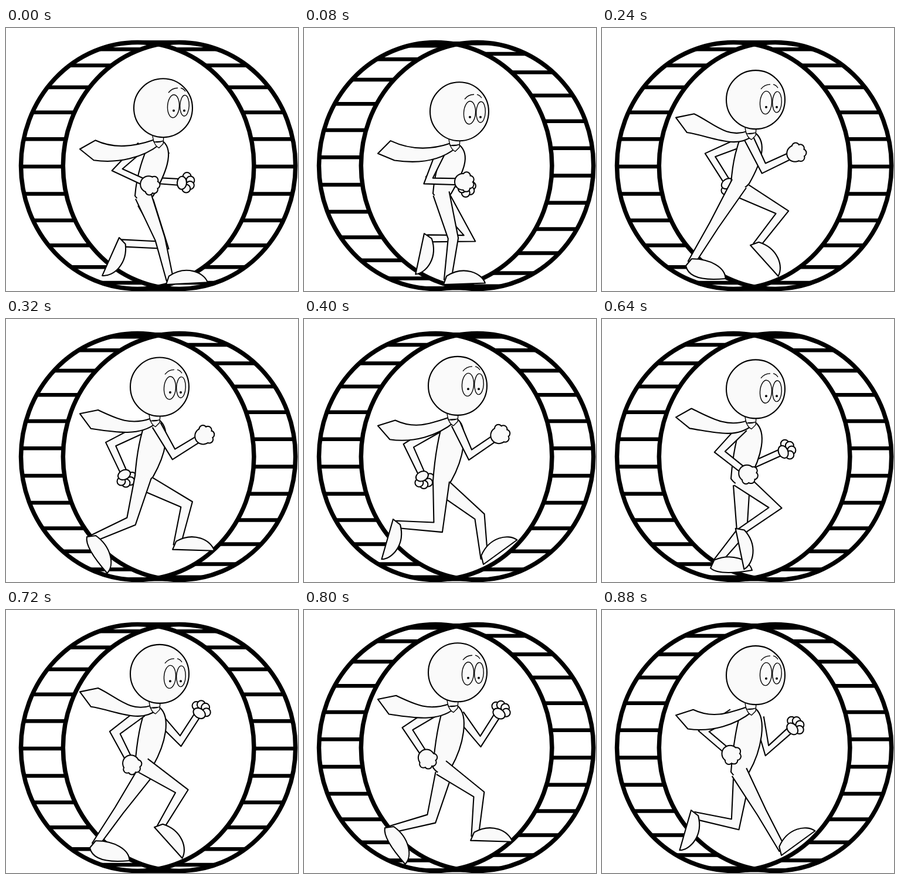
Recreate the animation shown at these times as an HTML page with a canvas. Size 498 by 448 pixels, loop 920 ms.

```html
<!DOCTYPE html>
<html lang="en">
<head>
<meta charset="utf-8">
<title>Running in a wheel</title>
<style>
html, body { margin: 0; width: 100%; height: 100%; overflow: hidden; background: #fff; }
canvas { display: block; }
</style>
</head>
<body>
<canvas id="stage" width="498" height="448"></canvas>
<script>
const ctx = document.getElementById('stage').getContext('2d');
const LOOP = 920, SLOT = 40;
const STRIDE = 960, STEP = STRIDE / 2;
const HOLDS = [120, 360, 440, 680, 840]; // slots that repeat the picture before them
const PAPER = '#fafafa', INK = '#000';

// Tracks of one value each: four keys repeat every step, eight every stride.
const KEYS = [0, 80, 240, 400];
const bob = {
  head: [134, 137, 115.5, 112.5],
  hip:  [286, 282, 265, 276],
  gaze: [-3, 2, 5, -2],
  tie:  [15, 9.5, -17, 18],
  flick: [-2, 5, -9.5, -7]
};
const foot = {
  x: [273, 238, 143, 152, 193, 205, 253, 306],
  y: [437, 437, 405, 341, 357, 350, 370, 418],
  angle: [-3, -2, 18, 106, 114, 102, 48, -36]
};
const nearHand = {
  x: [245, 273, 331, 334, 312, 291, 214, 220],
  y: [267, 262, 213, 197, 244, 260, 263, 246]
};
const farHand = {
  x: [304, 275, 217, 204, 240, 284, 331, 327],
  y: [263, 270, 268, 271, 280, 283, 172, 199]
};

const add = (p, x, y) => [p[0] + x, p[1] + y];
const wave = (t, peak) => Math.cos(2 * Math.PI * (t - peak) / STRIDE);

// Smooth cyclic curve through the keys of a track.
function at(track, t) {
  const n = track.length;
  t %= STEP * n / 4;
  const time = j => KEYS[(j + 4) % 4] + STEP * Math.floor(j / 4);
  const val = j => track[(j + n) % n];
  let i = n - 1;
  while (time(i) > t) i--;
  const d = time(i + 1) - time(i), s = (t - time(i)) / d;
  const slope = j => (val(j + 1) - val(j - 1)) / (time(j + 1) - time(j - 1)) * d;
  const s2 = s * s, s3 = s2 * s;
  return (2 * s3 - 3 * s2 + 1) * val(i) + (s3 - 2 * s2 + s) * slope(i) +
    (3 * s2 - 2 * s3) * val(i + 1) + (s3 - s2) * slope(i + 1);
}

function pose(part, t) {
  const out = {};
  for (const k in part) out[k] = at(part[k], t);
  return out;
}

function paint(path, width = 2.1, fill = PAPER) {
  if (fill) {
    ctx.fillStyle = fill;
    ctx.fill(path);
  }
  ctx.strokeStyle = INK;
  ctx.lineWidth = width;
  ctx.stroke(path);
}

function oval(x, y, rx, ry, width, fill, tilt = 0) {
  const p = new Path2D();
  p.ellipse(x, y, rx, ry, tilt, 0, Math.PI * 2);
  paint(p, width, fill);
}

function dot(x, y, r, fill) {
  ctx.fillStyle = fill;
  ctx.beginPath();
  ctx.arc(x, y, r, 0, Math.PI * 2);
  ctx.fill();
}

function wheel(t) {
  const cy = 234.5, ry = 210;
  const rings = [[224.2, 198.7], [295.5, 198.2]];
  ctx.strokeStyle = INK;
  ctx.lineWidth = 6.5;
  for (const side of [-1, 1]) {
    for (let k = -12; k <= 12; k++) {
      const u = k + side * t / 240 + 0.03;
      const deg = 12.75 * u + 0.06 * u ** 3;
      if (Math.abs(deg) > 91) continue;
      const a = deg * Math.PI / 180, y = cy + ry * Math.sin(a);
      ctx.beginPath();
      for (const [cx, rx] of rings) ctx.lineTo(cx + side * rx * Math.cos(a), y);
      ctx.stroke();
    }
  }
  for (const [cx, rx] of rings) oval(cx, cy, rx, ry, 7.5, null);
}

// Joint between root and end for two bones; side picks the way it bends.
function joint(root, end, upper, lower, side) {
  const dx = end[0] - root[0], dy = end[1] - root[1], d = Math.hypot(dx, dy);
  const along = d >= upper + lower ? d * upper / (upper + lower)
    : (d * d + upper * upper - lower * lower) / (2 * d);
  const out = side * Math.sqrt(Math.max(0, upper * upper - along * along)) * (d < upper + lower);
  return add(root, (dx * along - dy * out) / d, (dy * along + dx * out) / d);
}

// Tapered two-part limb, open at its root.
function limb(pts, half) {
  const dir = (a, b) => Math.atan2(b[1] - a[1], b[0] - a[0]);
  const a1 = dir(pts[0], pts[1]), a2 = dir(pts[1], pts[2]);
  const bend = Math.atan2(Math.sin(a2 - a1), Math.cos(a2 - a1)) / 2;
  const mitre = Math.min(1.3, 1 / Math.cos(bend));
  const ang = [a1, a1 + bend, a2];
  const side = s => pts.map((p, i) => {
    const w = s * half[i] * (i === 1 ? mitre : 1);
    return add(p, -Math.sin(ang[i]) * w, Math.cos(ang[i]) * w);
  });
  const path = new Path2D();
  for (const p of [...side(1), ...side(-1).reverse()]) path.lineTo(...p);
  paint(path);
  return a2;
}

function leg(hip, t) {
  const { x, y, angle } = pose(foot, t);
  const a = angle * Math.PI / 180, dx = 71 * Math.cos(a), dy = 71 * Math.sin(a);
  // Point along the sole (u) and above it (v).
  const on = (u, v) => [x + u * dx + v * dy, y + u * dy - v * dx];
  const ankle = on(0.1, 0.1);
  limb([hip, joint(hip, ankle, 79, 72, -1), ankle], [14, 8.5, 6]);
  // The sole bends while the heel lifts off.
  const roll = 0.35 * Math.max(0, 1 - Math.abs(t % STRIDE - 240) / 160);
  const shoe = new Path2D();
  shoe.moveTo(x, y);
  shoe.quadraticCurveTo(...on(0.2, -roll), ...on(1, 0));
  shoe.bezierCurveTo(...on(0.92, 0.25), ...on(0.5, 0.45 - 0.3 * roll), ...on(0.08, 0.2));
  shoe.closePath();
  paint(shoe);
}

function arm(shoulder, { x, y }, isFar) {
  const hand = [x, y];
  const a = limb([shoulder, joint(shoulder, hand, 58, 61, 1), hand], [8, 7, 5.5]);
  const c = Math.cos(a), s = Math.sin(a);
  const place = (u, v) => add(hand, u * c - v * s, u * s + v * c);
  const fingers = [-1.2, -0.4, 0.4, 1.2]
    .map(f => place(11 * Math.cos(f), 11 * Math.sin(f)));
  if (isFar) {
    for (const p of fingers) oval(...p, 7, 7, 2, PAPER);
    oval(...place(-4, 1), 8, 11, 2, PAPER, a);
  } else {
    const blobs = [[...place(-2, 0), 14], ...fingers.map(p => [...p, 6.5])];
    for (const [bx, by, r] of blobs) dot(bx, by, r + 1, INK);
    for (const [bx, by, r] of blobs) dot(bx, by, r - 1, PAPER);
  }
}

function torso(neck, hip) {
  const [nx, ny] = neck, [hx, hy] = hip;
  const p = new Path2D();
  p.moveTo(nx + 9, ny);
  p.lineTo(nx - 14, ny);
  p.bezierCurveTo(nx - 23, ny + 22, hx - 11, hy - 40, hx - 14, hy);
  p.quadraticCurveTo(hx, hy + 20, hx + 17, hy);
  p.bezierCurveTo(hx + 38, hy - 37, nx + 29, ny + 17, nx + 9, ny);
  paint(p);
}

function drawTie(neck, sag, flick) {
  const end = [151, neck[1] + sag], tip = add(end, -25, flick);
  const k = 17 / Math.hypot(25, flick);
  const top = add(end, -flick * k, -25 * k), low = add(end, flick * k, 25 * k);
  const knot = add(neck, -6, -3), base = add(neck, 3, 5);
  const p = new Path2D();
  p.moveTo(...knot);
  p.bezierCurveTo(...add(knot, -35, 12), ...add(top, 32, 15), ...top);
  p.lineTo(...tip);
  p.lineTo(...low);
  p.bezierCurveTo(...add(low, 40, 6), ...add(base, -28, 23), ...base);
  p.closePath();
  paint(p);

  const [x, y] = neck;
  const collar = new Path2D();
  collar.moveTo(x - 9, y - 10);
  collar.lineTo(x + 10, y - 10);
  collar.lineTo(x + 9, y + 4);
  collar.lineTo(x + 2, y + 11);
  collar.quadraticCurveTo(x - 7, y + 7, x - 9, y - 10);
  collar.moveTo(x - 8, y);
  collar.quadraticCurveTo(x, y + 3, x + 9, y - 1);
  paint(collar, 1.4);
}

function drawHead([x, y], gaze) {
  oval(x, y, 50, 50, 2.1, PAPER);
  const ey = y + gaze;
  oval(x + 17.5, ey, 10, 19.5, 1.4, PAPER, 0.06);
  oval(x + 36.5, ey - 1, 7.8, 17.8, 1.4, PAPER, 0.04);
  dot(x + 18, ey + 7.5, 2, INK);
  dot(x + 36, ey + 7.5, 2, INK);
  const brows = new Path2D();
  brows.moveTo(x + 9, ey - 23);
  brows.quadraticCurveTo(x + 15, ey - 31, x + 25, ey - 31);
  brows.moveTo(x + 30, ey - 31);
  brows.quadraticCurveTo(x + 35, ey - 30, x + 38, ey - 25);
  paint(brows, 1.3, null);
}

function draw(t) {
  ctx.fillStyle = '#fff';
  ctx.fillRect(0, 0, 498, 448);
  ctx.lineJoin = 'round';
  wheel(t);

  const now = pose(bob, t);
  const head = [262 + 6 * Math.max(0, 1 - t / 160), now.head + 7 * wave(t, 190)];
  const neck = add(head, -9, 57);
  const hip = [234, now.hip];
  const twist = wave(t, 400);

  arm(add(neck, -5 - 20 * twist, 15), pose(farHand, t), true);
  leg(add(hip, 4, 11), t + STEP);
  torso(neck, hip);
  leg(hip, t);
  arm(add(neck, -12 + 18 * twist, 8), pose(nearHand, t), false);
  drawTie(neck, now.tie, now.flick);
  drawHead(head, now.gaze);
}

const start = performance.now();
function tick() {
  const slot = Math.floor((performance.now() - start) % LOOP / SLOT) * SLOT;
  draw(HOLDS.includes(slot) ? slot - SLOT : slot);
  requestAnimationFrame(tick);
}
tick();
</script>
</body>
</html>
```
